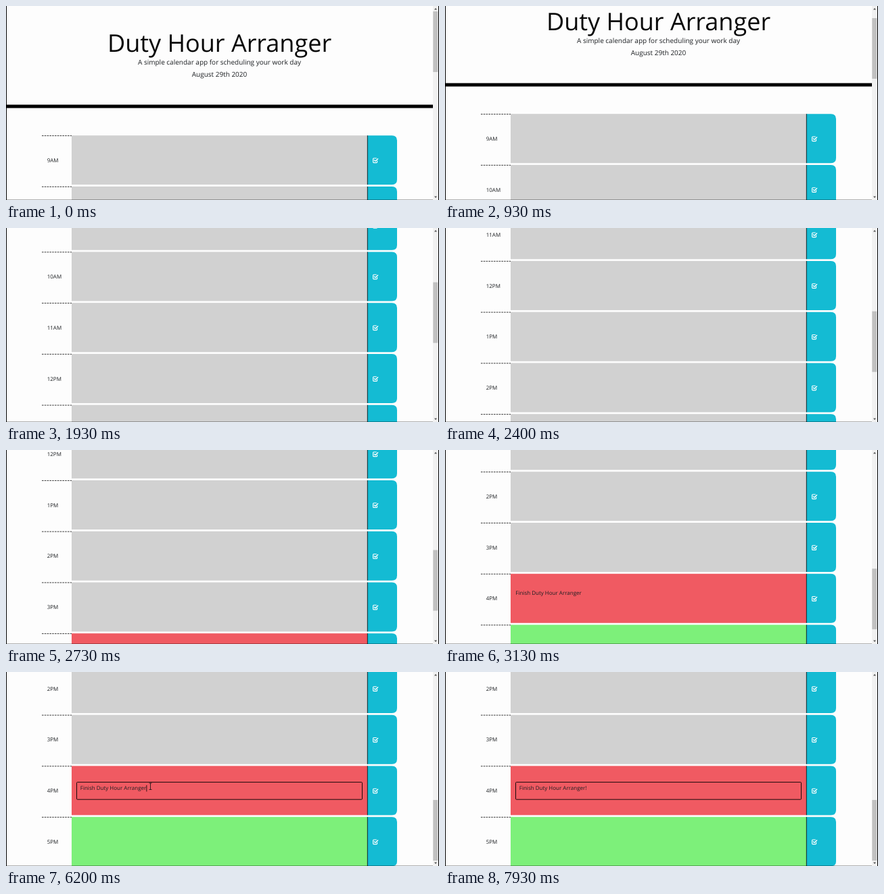
Write an HTML page that moves like this. It is 640x288 px and loops after 8000 ms.

```html
<!DOCTYPE html>
<html lang="en">
<head>
<meta charset="utf-8">
<title>Day planner</title>
<style>
  html, body { margin: 0; width: 100%; height: 100%; overflow: hidden; background: #fdfdfd; }
  svg { display: block; width: 640px; height: 288px; }
  text { font: 8px "Open Sans", sans-serif; fill: #1c1f22; text-rendering: geometricPrecision; }
  .title { font-size: 36px; fill: #080808; }
  .lead { font-size: 10px; }
  .center { text-anchor: middle; }
  .hidden { visibility: hidden; }
</style>
</head>
<body>
<svg viewBox="0 0 640 288">
  <defs>
    <g id="check" fill="none" stroke="#fff">
      <path d="M6.6 4.6V6.6Q6.6 7.6 5.6 7.6H1.6Q.6 7.6 .6 6.6V2Q.6 1 1.6 1H5.8" stroke-width="1.1"/>
      <path d="M2 3.6L3.9 5.4L8 1.4" stroke-width="1.4"/>
    </g>
  </defs>
  <g id="page">
    <text class="title center" x="315.5" y="67.5">Duty Hour Arranger</text>
    <text class="lead center" x="315.5" y="87.2">A simple calendar app for scheduling your work day</text>
    <text class="lead center" x="315.5" y="105">August 29th 2020</text>
    <path d="M0 146.5H631V151.5H0Z"/>
    <g id="rows"></g>
    <g id="editor">
      <rect x="104.5" y="746.6" width="422" height="25.6" rx="1" fill="none" stroke="#1a0a0b"/>
      <rect id="caret" y="751" width=".8" height="9.5"/>
    </g>
    <text id="task"></text>
  </g>
  <path d="M0 287H631V288H0Z" opacity=".3"/>
  <path d="M0 0H1V288H0ZM639 0H640V288H639Z"/>
  <path d="M631 0H639V288H631Z" fill="#f1f1f1"/>
  <path d="M633 5.5L635 3L637 5.5ZM633 282.5L635 285L637 282.5Z" fill="#505050"/>
  <rect id="thumb" x="631.3" width="7" height="90" fill="#c1c1c1"/>
  <path id="arrow" d="M0 0V11.2L2.6 8.8L4.4 12.8L6.2 12L4.4 8.1H8Z" fill="#fff" stroke="#222" stroke-width=".7"/>
  <path id="beam" d="M211.5 165H215.5M213.5 165V174.5M211.5 174.5H215.5" fill="none" stroke="#111" stroke-width=".8"/>
</svg>
<script>
const LOOP = 8000, FPS = 15, MAX_SCROLL = 583;
const ROW_TOP = 192.2, ROW_STEP = 75.75, ROW_HEIGHT = 73;
const TASK = "Finish Duty Hour Arranger";
const $ = id => document.getElementById(id);
const show = (id, on) => $(id).classList.toggle("hidden", !on);

const hours = ["9AM", "10AM", "11AM", "12PM", "1PM", "2PM", "3PM", "4PM", "5PM"];
const rowColor = i => i < 7 ? "#d1d1d1" : i === 7 ? "#f05a62" : "#7df07a";

$("rows").innerHTML = hours.map((hour, i) => `
  <g transform="translate(0 ${ROW_TOP + i * ROW_STEP})">
    <path d="M53 .4H97" stroke="#222" stroke-width=".9" stroke-dasharray="2.6 1.2"/>
    <text x="60.7" y="39.6">${hour}</text>
    <rect x="97" width="437" height="${ROW_HEIGHT}" fill="${rowColor(i)}"/>
    <path d="M534 0H570.5Q578 0 578 7.5V${ROW_HEIGHT - 7.5}Q578 ${ROW_HEIGHT} 570.5 ${ROW_HEIGHT}H534Z" fill="#14bbd3"/>
    <path d="M534.3 0V${ROW_HEIGHT}" stroke="#111" stroke-width=".9"/>
    <use href="#check" x="542" y="32.8"/>
  </g>`).join("");

// Smooth curve through [step, value] points; steps are 1/15 s.
function curve(points, x) {
  const last = points.length - 1;
  if (x <= points[0][0]) return points[0][1];
  if (x >= points[last][0]) return points[last][1];
  const i = points.findIndex(p => p[0] > x) - 1;
  const slope = k => {
    const a = points[Math.max(k - 1, 0)], b = points[Math.min(k + 1, last)];
    return (b[1] - a[1]) / (b[0] - a[0]);
  };
  const [x0, y0] = points[i], [x1, y1] = points[i + 1];
  const w = x1 - x0, u = (x - x0) / w, v = 1 - u;
  return y0 * (1 + 2 * u) * v * v + slope(i) * w * u * v * v
       + y1 * u * u * (3 - 2 * u) - slope(i + 1) * w * u * u * v;
}

const scrollPath = [[9, 0], [14, 32], [23, 121.5], [36, 370.5], [47, 538.7], [50, MAX_SCROLL]];
const glide = (step, from, to) => {
  const u = Math.min(1, Math.max(0, (step - from) / (to - from)));
  return u * (2 - u);
};

function draw(t) {
  const step = Math.floor((t + 7) * FPS / 1000);
  const scroll = curve(scrollPath, step);
  $("page").setAttribute("transform", `translate(0 ${-scroll})`);
  $("thumb").setAttribute("y", 8 + scroll / MAX_SCROLL * 182);

  const enter = glide(step, 54, 58), approach = glide(step, 62, 71);
  const x = 520 - 190 * enter - 116.3 * approach;
  const y = 214 - 22 * enter - 23 * approach;
  $("arrow").setAttribute("transform", `translate(${x} ${y})`);
  show("arrow", t >= 3660 && t < 5200);
  show("beam", t >= 5200 && t < 7130);

  const editing = t >= 5130;
  const task = $("task");
  task.textContent = TASK + (t >= 7460 ? "!" : "");
  task.setAttribute("x", editing ? 109.8 : 104.3);
  task.setAttribute("y", editing ? 758.4 : 753.4);
  show("editor", editing);
  const caretOn = t < 5660 || t >= 6200 && t < 6730 || t >= 7260 && t < 7930;
  $("caret").setAttribute("x", 110 + task.getComputedTextLength());
  show("caret", true);
  $("caret").style.display = caretOn ? "" : "none";
}

const start = performance.now();
function tick() {
  draw((performance.now() - start) % LOOP);
  requestAnimationFrame(tick);
}
tick();
</script>
</body>
</html>
```
